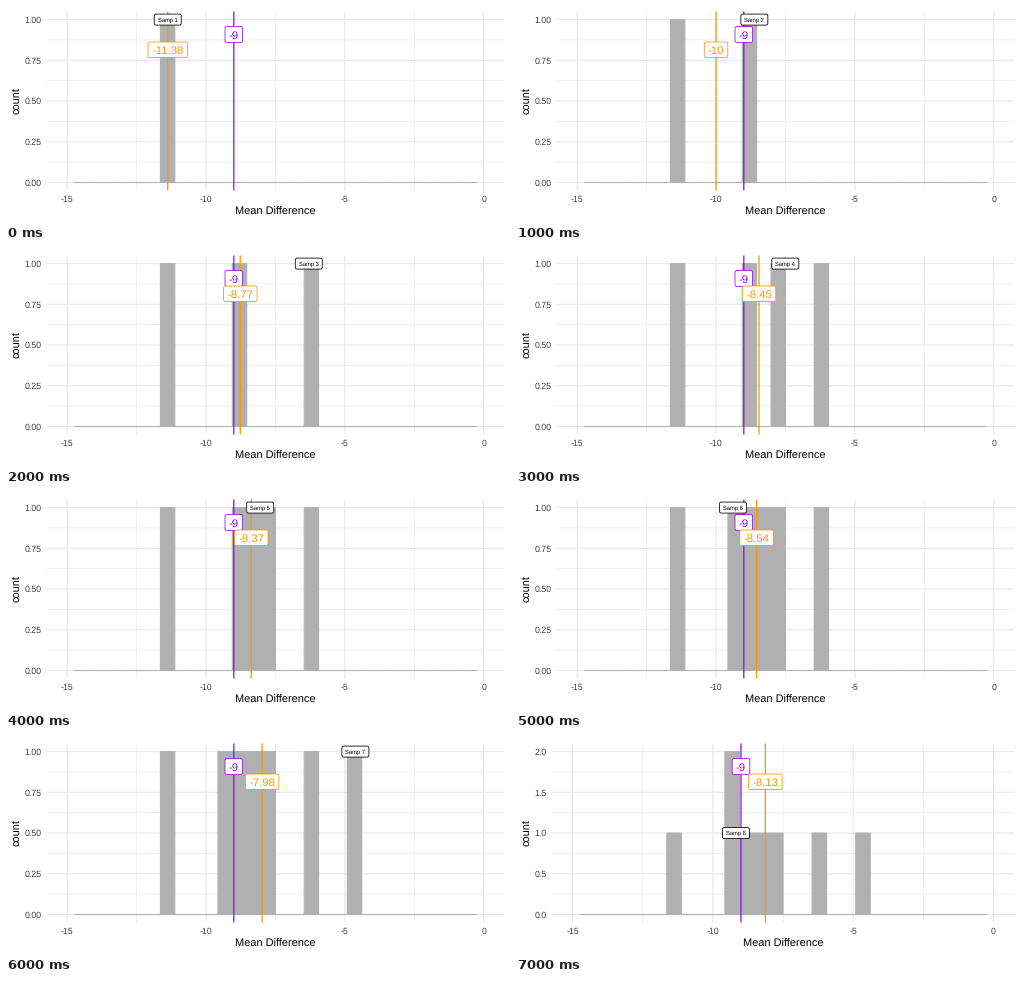
Write a matplotlib script that moves like this. It is 504x216 px and loops after 8000 ms.

```python
import math

import matplotlib.pyplot as plt
from matplotlib.animation import FuncAnimation
from matplotlib.patches import FancyBboxPatch, Rectangle

W, H = 504, 216
plt.rcParams.update({
    "font.family": "Liberation Sans",
    "text.hinting": "none",
    "path.snap": False,
    "axes.unicode_minus": False,
})

GREY, GRID, TICK = "#b0b0b0", "#e7e7e7", "#404040"
ORANGE, PURPLE = "#ff9700", "#9012ee"
SAMPLES = [-11.38, -8.62, -6.3, -7.505, -8.05, -9.39, -4.62, -9.18]
NULL_MEAN = -9
BINS, LO, HI = 28, -14.75, -0.25
BIN_W = (HI - LO) / BINS
TOP, BOTTOM, RIGHT = 5.5, 184.5, 498.5
Y_ZERO, Y_MAX = 176.5, 13.6

fig = plt.figure(figsize=(W / 72, H / 72), dpi=72, facecolor="white")
ax = fig.add_axes([0, 0, 1, 1])


def line(xs, ys, color, width):
    ax.plot(xs, ys, color=color, lw=width, solid_capstyle="butt")


def text(x, y, s, size, color="black", **kw):
    kw = {"ha": "center", "va": "center_baseline", **kw}
    ax.text(x, y, s, fontsize=size, color=color, **kw)


def label(x, y, s, size, color, width, height):
    ax.add_patch(FancyBboxPatch(
        (x - width / 2, y - height / 2), width, height,
        boxstyle="round,pad=0,rounding_size=1.9",
        fc="white", ec=color, lw=0.8, zorder=5))
    text(x, y + size * 0.36, s, size, color, va="baseline", zorder=6)


def draw_grid(left, px, py, peak):
    for i in range(7):
        v = -15 + 2.5 * i
        line([px(v)] * 2, [TOP, BOTTOM], GRID, 0.55 if i % 2 else 1.07)
        if i % 2 == 0:
            text(px(v), 196, f"{v:g}", 8.8, TICK, va="baseline")
    for i in range(9):
        v = peak * i / 8
        line([left, RIGHT], [py(v)] * 2, GRID, 0.55 if i % 2 else 1.07)
        if i % 2 == 0:
            s = f"{v:.2f}" if peak == 1 else f"{v:.1f}"
            text(left - 4.6, py(v) + 3.2, s, 8.8, TICK, ha="right", va="baseline")
    text((left + RIGHT) / 2, 209, "Mean Difference", 11, va="baseline")
    text(10.5, 95, "count", 11, rotation=90, va="center")


def draw_bars(px, py, counts):
    for i, n in enumerate(counts):
        x0, x1 = px(LO + i * BIN_W), px(LO + (i + 1) * BIN_W)
        ax.add_patch(Rectangle((x0, py(n)), x1 - x0, Y_ZERO - py(n),
                               fc=GREY, ec=GREY, lw=1.07, zorder=3))


def draw(frame):
    ax.clear()
    ax.set(xlim=(0, W), ylim=(H, 0))
    ax.axis("off")

    seen = SAMPLES[:frame + 1]
    counts = [0] * BINS
    for s in seen:
        counts[math.floor((s - LO) / BIN_W)] += 1
    peak = max(counts)
    left = 40.4 if peak == 1 else 35.6

    def px(v):
        return left + (v + 15.75) * (RIGHT - left) / 16.5

    def py(n):
        return Y_ZERO - (Y_ZERO - Y_MAX) * n / peak

    draw_grid(left, px, py, peak)
    draw_bars(px, py, counts)

    mean = sum(seen) / len(seen)
    mean_text = f"{round(mean, 2):g}"
    for x, color in ((mean, ORANGE), (NULL_MEAN, PURPLE)):
        line([px(x)] * 2, [TOP, BOTTOM], color, 1.3)
        ax.lines[-1].set_zorder(4)

    label(px(seen[-1]), py(1), f"Samp {len(seen)}", 5.7, "black", 27, 11)
    label(px(NULL_MEAN), 28.5, str(NULL_MEAN), 11.4, PURPLE, 17.6, 16)
    mean_width = {3: 23.5, 5: 33.5, 6: 39.5}[len(mean_text)]
    label(px(mean), 43.8, mean_text, 11.4, ORANGE, mean_width, 15.6)
    return []


anim = FuncAnimation(fig, draw, frames=len(SAMPLES), init_func=lambda: [],
                     interval=1000, repeat=True, repeat_delay=0, blit=False)
plt.show()
```
